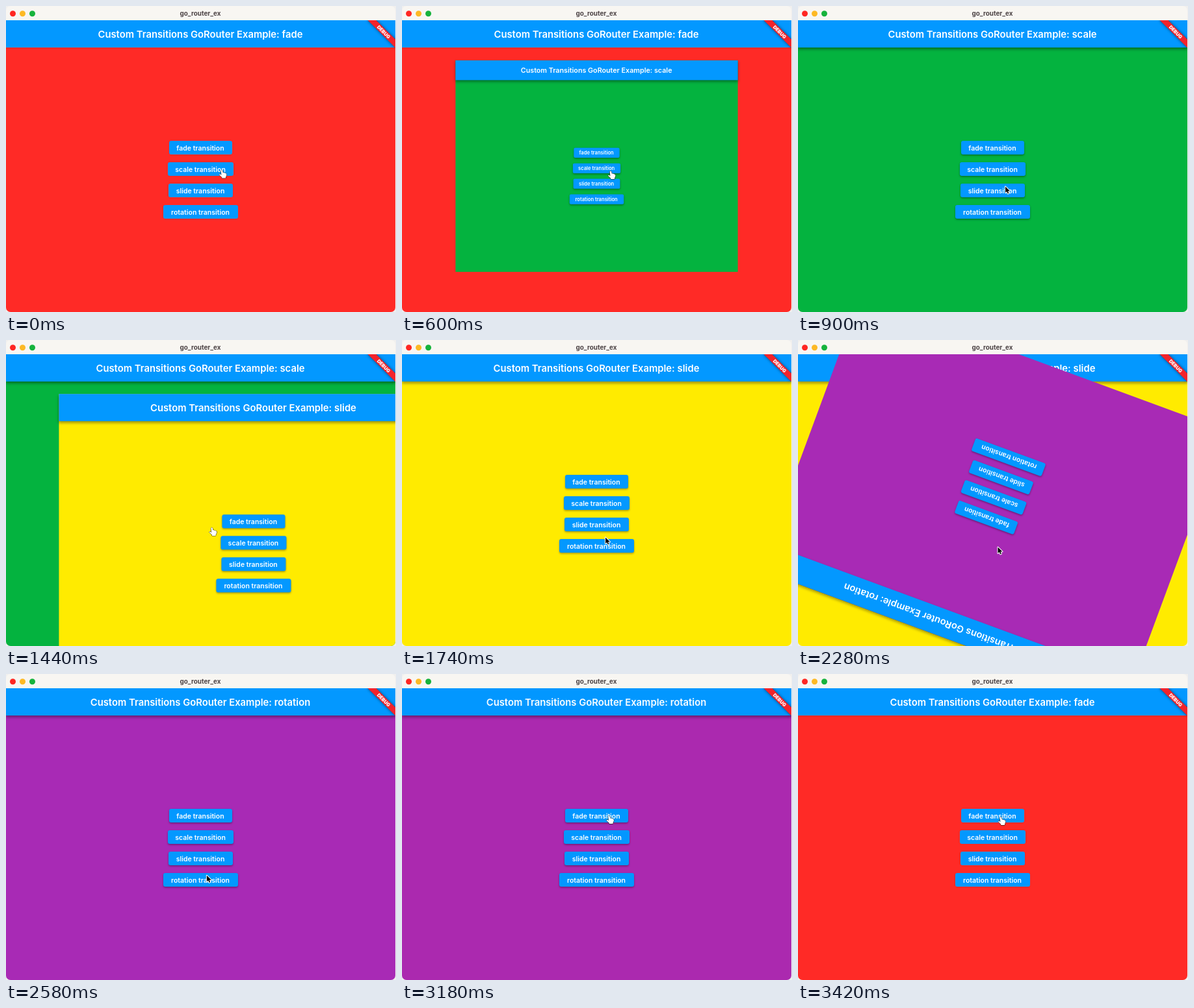
Animation, 600 px wide and 472 px high, one loop 3.48 s. Source, as an HTML page with a canvas:

```html
<!DOCTYPE html>
<html lang="en">
<head>
<meta charset="utf-8">
<title>Page transitions</title>
<style>
  html, body { margin: 0; width: 100%; height: 100%; overflow: hidden; background: #f0efee; }
  canvas { display: block; }
</style>
</head>
<body>
<canvas id="stage" width="600" height="472"></canvas>
<script>
const LOOP = 3480, STEP = 60, DURATION = 240;
const W = 599, H = 472, TOP = 22, BAR = 42;
const CX = W / 2, CY = (TOP + H) / 2;
const BLUE = '#0398ff';
const FONT = 'Inter, "Open Sans", sans-serif';

const screen = document.getElementById('stage').getContext('2d');
const layer = document.createElement('canvas');
layer.width = 600;
layer.height = H;
const layerCtx = layer.getContext('2d');

const pages = {
  fade: { color: '#ff2a26', shade: 0 },
  scale: { color: '#04b33f', shade: 0.36 },
  slide: { color: '#ffeb00', shade: 0.36 },
  rotation: { color: '#a82ab5', shade: 0.36 }
};

const buttons = [
  { name: 'fade', w: 97 },
  { name: 'scale', w: 101 },
  { name: 'slide', w: 99 },
  { name: 'rotation', w: 115 }
];

const clicks = [
  { at: 426, from: 'fade', to: 'scale' },
  { at: 1290, from: 'scale', to: 'slide' },
  { at: 2146.5, from: 'slide', to: 'rotation' },
  { at: 3172, from: 'rotation', to: 'fade' }
];

// time, x, y of the pointer's hot spot
const pointerPath = [
  [0, 332, 253], [300, 330, 254], [600, 321, 254.5], [900, 319, 278.5],
  [1290, 318, 284], [1740, 313, 304.5], [2100, 307.5, 317], [2280, 307.5, 319.5],
  [2640, 309, 310], [3000, 319, 222], [3180, 318.5, 218.5], [3420, 312, 220.5],
  [LOOP, 312, 220.5]
];
const handTimes = [[0, 720], [1140, 1590], [1920, 2220], [2940, LOOP]];

const arrow = new Path2D('M0 0V9.6L2.2 7.6L3.8 11L5.3 10.3L3.9 7H7Z');
const hand = new Path2D(
  'M-1.4 1Q0 -1 1.2 1L1.8 4.2Q3 3.2 3.9 4.6Q5.2 3.8 5.9 5.2' +
  'Q7.4 5 7.4 6.6Q7.6 9 6 11V12.6H.2V11.2L-3.8 7.6Q-4 5.8-2.2 6.4L-.6 7.6Z');

function text(c, str, x, y, weight, size, color = '#fff') {
  c.font = `${weight} ${size}px ${FONT}`;
  c.textAlign = 'center';
  c.fillStyle = color;
  c.fillText(str, x, y);
}

function withShadow(c, alpha, blur, dy, draw) {
  c.save();
  c.shadowColor = `rgba(0, 0, 0, ${alpha})`;
  c.shadowBlur = blur;
  c.shadowOffsetY = dy;
  draw();
  c.restore();
}

function drawPage(c, name) {
  const { color, shade } = pages[name];
  c.fillStyle = color;
  c.fillRect(0, TOP, W, H - TOP);
  c.fillStyle = BLUE;
  withShadow(c, shade, 4, 2.5, () => c.fillRect(0, TOP, W, BAR));
  text(c, `Custom Transitions GoRouter Example: ${name}`, 299, 48.5, 600, 14.8);
  buttons.forEach((b, i) => {
    const y = 208 + 33 * i;
    c.fillStyle = BLUE;
    c.beginPath();
    c.roundRect(CX - b.w / 2, y, b.w, 21, 3);
    withShadow(c, shade, 3, 1.5, () => c.fill());
    text(c, `${b.name} transition`, 299, y + 14.6, 600, 10.5);
  });
}

const enter = {
  fade(c, p) {
    layerCtx.clearRect(0, 0, 600, H);
    drawPage(layerCtx, 'fade');
    c.globalAlpha = p;
    c.drawImage(layer, 0, 0);
  },
  scale(c, p) {
    c.translate(CX, CY);
    c.scale(p, p);
    c.translate(-CX, -CY);
    drawPage(c, 'scale');
  },
  slide(c, p) {
    const rest = 0.25 * (1 - Math.pow(p, 1.67));
    c.translate(rest * W, rest * (H - TOP));
    drawPage(c, 'slide');
  },
  rotation(c, p) {
    c.translate(CX, CY);
    c.rotate(p * 2 * Math.PI);
    c.translate(-CX, -CY);
    drawPage(c, 'rotation');
  }
};

function drawContent(c, t) {
  const click = clicks.filter(k => t >= k.at).pop();
  if (!click) return drawPage(c, 'fade');
  const p = (t - click.at) / DURATION;
  if (p >= 1) return drawPage(c, click.to);
  drawPage(c, click.from);
  c.save();
  enter[click.to](c, p);
  c.restore();
}

function drawBanner(c) {
  c.save();
  c.translate(W, TOP);
  c.rotate(Math.PI / 4);
  c.fillStyle = '#f3232b';
  withShadow(c, 0.6, 4, 0, () => c.fillRect(-30, 20.9, 60, 9));
  text(c, 'DEBUG', 0, 28.1, 900, 7.3);
  c.restore();
}

function drawTitleBar(c) {
  c.fillStyle = '#f8f6f2';
  c.fillRect(0, 0, W, TOP);
  ['#ff2722', '#fdb924', '#16b33c'].forEach((color, i) => {
    c.fillStyle = color;
    c.beginPath();
    c.arc(10.5 + 15 * i, 11.8, 4.5, 0, 2 * Math.PI);
    c.fill();
  });
  text(c, 'go_router_ex', 299, 15.2, 700, 9.9, '#4b4244');
}

function drawPointer(c, t) {
  const i = pointerPath.findIndex(k => k[0] > t);
  const [t0, x0, y0] = pointerPath[i - 1];
  const [t1, x1, y1] = pointerPath[i];
  const u = (t - t0) / (t1 - t0);
  const e = u * u * (3 - 2 * u);
  const isHand = handTimes.some(([a, b]) => t >= a && t < b);
  c.save();
  c.translate(x0 + (x1 - x0) * e, y0 + (y1 - y0) * e);
  c.lineJoin = 'round';
  c.lineWidth = isHand ? 1 : 2;
  c.strokeStyle = isHand ? '#111' : '#fff';
  c.fillStyle = isHand ? '#fff' : '#000';
  const shape = isHand ? hand : arrow;
  c.stroke(shape);
  c.fill(shape);
  c.restore();
}

function render(t) {
  const c = screen;
  c.fillStyle = '#f0efee';
  c.fillRect(0, 0, 600, H);
  c.save();
  c.beginPath();
  c.roundRect(0, 0, W, H, 7);
  c.clip();
  c.save();
  c.beginPath();
  c.rect(0, TOP, W, H - TOP);
  c.clip();
  drawContent(c, t);
  drawBanner(c);
  c.restore();
  drawTitleBar(c);
  c.restore();
  drawPointer(c, t);
}

const start = performance.now();
function tick() {
  const t = (performance.now() - start) % LOOP;
  render(Math.floor(t / STEP) * STEP);
  requestAnimationFrame(tick);
}
tick();
</script>
</body>
</html>
```
